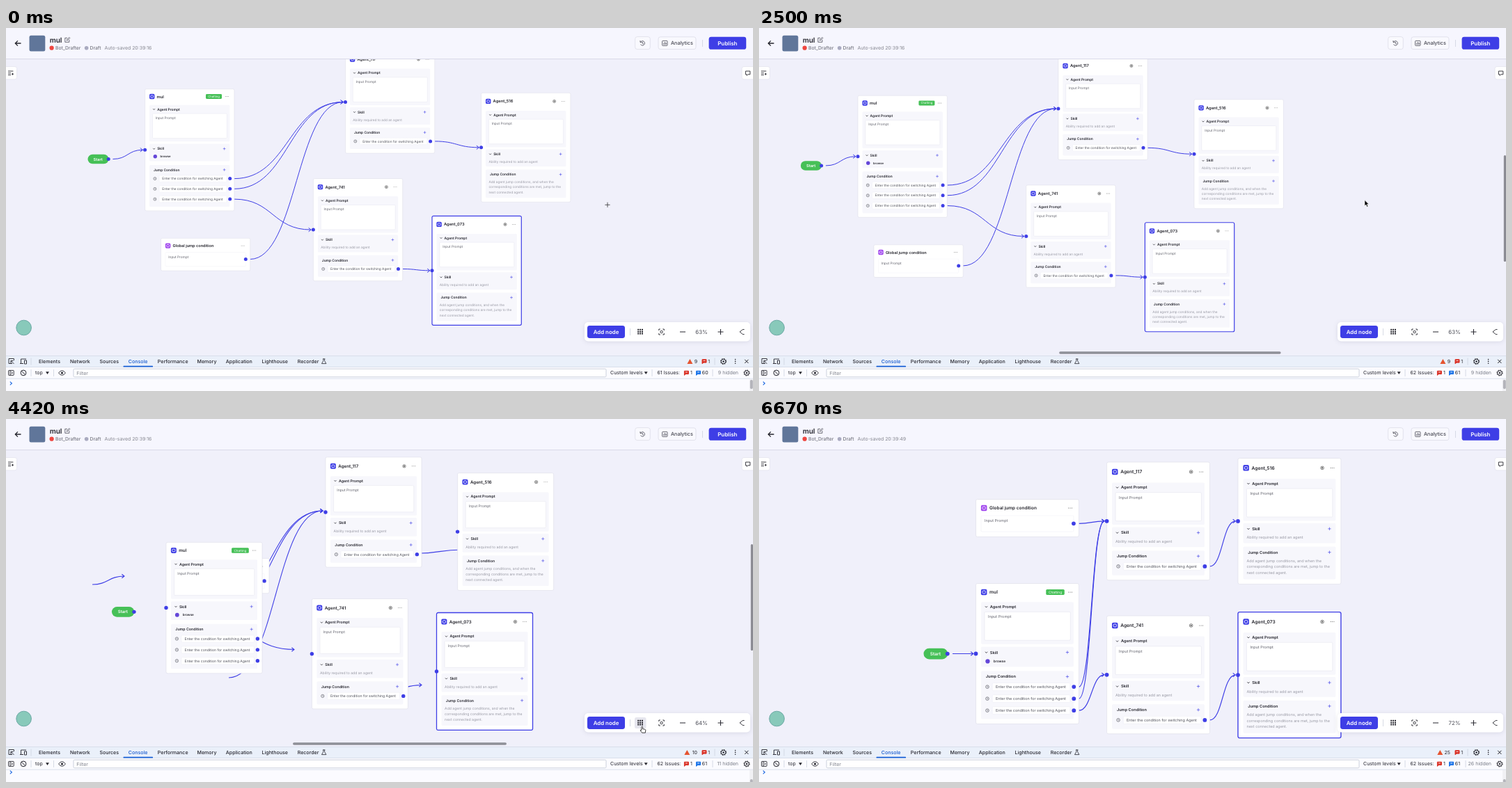
An HTML page that plays this animation: 1073 by 522 pixels, repeating every 7160 ms.

```html
<!DOCTYPE html>
<html lang="en">
<head>
<meta charset="utf-8">
<title>Agent flow editor</title>
<style>
html, body { margin: 0; width: 100%; height: 100%; overflow: hidden; background: #f0f0fa; }
svg { display: block; width: 1073px; height: 522px; font-family: Inter, sans-serif; text-rendering: geometricPrecision; }
text { white-space: pre; }
</style>
</head>
<body>
<svg id="stage" viewBox="0 0 1073 522"></svg>
<script>
const BLUE = '#3e3ee6', INK = '#24242c', GREY = '#999aa5', MID = '#62636d';
const FPS = 12, LOOP = 7160;

// ---------- markup helpers ----------
const text = (x, cy, str, size, fill = INK, extra = '') =>
  `<text x="${x}" y="${(cy + size * .36).toFixed(2)}" font-size="${size}" fill="${fill}" ${extra}>${str}</text>`;
const bold = (x, cy, str, size, fill = INK, extra = '') => text(x, cy, str, size, fill, 'font-weight="600" ' + extra);
const rect = (x, y, w, h, r, fill, extra = '') =>
  `<rect x="${x}" y="${y}" width="${w}" height="${h}" rx="${r}" fill="${fill}" ${extra}/>`;
const dot = (x, y, r, fill, extra = '') => `<circle cx="${x}" cy="${y}" r="${r}" fill="${fill}" ${extra}/>`;
const line = (d, stroke = INK, w = 1, extra = '') =>
  `<path d="${d}" fill="none" stroke="${stroke}" stroke-width="${w}" ${extra}/>`;
const plus = (x, y, r, stroke, w) => line(`M${x - r} ${y}h${2 * r}M${x} ${y - r}v${2 * r}`, stroke, w);
const dots = (x, y, gap, r, fill) => [-gap, 0, gap].map(d => dot(x + d, y, r, fill)).join('');
const edging = (color, w = .6) => `stroke="${color}" stroke-width="${w}"`;
const middle = 'text-anchor="middle"';

// ---------- flow nodes, drawn at 63 % zoom ----------
const W = 128.3;
const chevron = y => line(`M11.6 ${y - .7}l1.4 1.5 1.4 -1.5`, INK, .7);
const port = (x, y) => dot(x, y, 2.5, BLUE);
const frame = (h, selected) => rect(0, 0, W, h, 2, '#fff', selected ? edging(BLUE, 1.2) : edging('#dfdfea'));
const section = (y, h) => rect(6.5, y, 115.3, h, 1.5, '#f7f7fc');
const nodeIcon = (y, fill) => rect(6.4, y - 3.7, 7.4, 7.4, 1.7, fill) +
  rect(8.2, y - 1.7, 3.8, 3.4, 1.1, 'none', edging('#fff', .7));

function condition(y) {
  return dot(14.3, y, 2, 'none', edging('#55565f')) + line(`M14.3 ${y - 1}v1.2h.9`, '#55565f', .5) +
    rect(20.5, y - 4.8, 97, 9.6, 1.2, '#fff', edging('#ececf4', .5)) +
    text(24.7, y, 'Enter the condition for switching Agent', 4.75, '#50515b') + port(122.1, y);
}

function agent(title, h, rows, opts = {}) {
  const main = opts.main;
  const [yT, yA, yS, yJ] = main ? [10.8, 29.1, 85.9, 116.2] : [12.1, 31.6, 88, 117.3];
  let out = frame(h, opts.selected) + nodeIcon(yT, BLUE) + bold(17, yT, title, 5.75) + dots(117.6, yT, 2, .45, '#444');
  out += main
    ? rect(87.4, yT - 3.5, 23, 7, 1.4, '#46c057') + text(98.9, yT, 'Chatting', 4.2, '#fff', middle)
    : dot(105, yT, 2, 'none', edging('#444')) + dot(105, yT, .9, '#444');
  out += section(yA - 6, 52.5) + chevron(yA) + bold(17.6, yA, 'Agent Prompt', 4.9) +
    rect(10.8, yA + 6.3, 107, 35.5, 1.2, '#fff', edging('#e4e4ee', .5)) + text(15.2, yA + 12.5, 'Input Prompt', 4.75, MID);
  out += section(yS - 7, 25) + chevron(yS) + bold(17.6, yS, 'Skill', 4.9) + plus(114, yS, 1.9, BLUE, .55);
  out += main
    ? dot(14.7, yS + 11.2, 2.7, '#6446d8') + bold(22, yS + 11.2, 'browse', 4.2)
    : text(10.8, yS + 10.9, 'Ability required to add an agent', 4.75, GREY);
  out += section(yJ - 7, h - yJ + 1) + bold(12.4, yJ, 'Jump Condition', 4.9) + plus(114, yJ, 1.9, BLUE, .55);
  for (let i = 0; i < rows; i++) out += condition(yJ + 12.7 + i * 14.75);
  if (!rows) ['Add agent jump conditions, and when the', 'corresponding conditions are met, jump to the', 'next connected agent.']
    .forEach((s, i) => out += text(10.8, yJ + 10.8 + i * 7.2, s, 4.75, GREY));
  return out + port(0, h / 2);
}

const globalNode = frame(46.8) + nodeIcon(10.8, '#a045ee') + bold(17, 10.8, 'Global jump condition', 5.6) +
  dots(117.6, 10.8, 2, .45, '#444') + rect(6.5, 20.4, 115.3, 20, 1, '#fff', edging('#f0f0f6', .5)) +
  text(10.8, 26.5, 'Input Prompt', 4.75, MID) + port(121.8, 30.2);
const startNode = rect(0, 0, 30, 13.6, 6.8, '#46c057') + bold(14.7, 6.8, 'Start', 5.6, '#fff', middle) + port(29.7, 6.8);

// at: scattered layout, mid-way layout, tidy layout
const nodes = {
  start:  { art: startNode, in: 0, at: [[117.5, 181.7], [152, 270], [236.5, 329.7]] },
  global: { art: globalNode, in: 0, at: [[222.5, 302.3], [240, 200.4], [311.5, 115.5]] },
  mul:    { art: agent('mul', 175.2, 3, { main: true }), in: 87.6, at: [[199.6, 87.7], [230, 177.3], [311.5, 236.5]] },
  a117:   { art: agent('Agent_117', 147.2, 1), in: 73.6, at: [[487.5, 32.9], [459, 54.8], [499.6, 62]] },
  a516:   { art: agent('Agent_516', 157, 0), in: 78.5, at: [[682.6, 93.3], [648.6, 77.6], [688, 56.4]] },
  a741:   { art: agent('Agent_741', 147.2, 1), in: 73.6, at: [[441.4, 216.5], [439.4, 258.5], [499.6, 283]] },
  a073:   { art: agent('Agent_073', 157, 0, { selected: true }), in: 78.5, at: [[612, 270.3], [618.5, 278.5], [688, 277.6]] },
};
const SCALE = [1, 1.076, 1.153];

// from, port x, port y, to, end points while the layout is moving
const edges = [
  ['start', 29.7, 6.8, 'a_mul', [124, 238, 170, 226]],
  ['mul', 122.1, 128.9, 'a117', [305, 270, 455, 132]],
  ['mul', 122.1, 143.6, 'a117', [305, 285, 455, 132]],
  ['mul', 122.1, 158.4, 'a741', [305, 300, 414, 331.5]],
  ['global', 121.8, 30.2, 'a117', [320, 372, 455, 132]],
  ['a117', 122.1, 130, 'a516', [590, 193.3, 655, 188]],
  ['a741', 122.1, 130, 'a073', [548, 390, 597, 382.5]],
].map(([from, x, y, to, moving]) => ({ from, x, y, to: to === 'a_mul' ? 'mul' : to, moving }));

// ---------- fixed interface ----------
const gear = (x, y) => dot(x, y, 3.3, 'none', edging(INK, 1)) + dot(x, y, 1.2, INK) +
  dot(x, y, 4.1, 'none', 'stroke="#24242c" stroke-width="1" stroke-dasharray="1.6 1.62"');
const bubble = (x, y, fill) => line(`M${x - 3} ${y - 2.8}h6v4.4h-4l-2 1.7z`, fill, 1, `style="fill:${fill}"`) +
  line(`M${x - 1.5} ${y - 1}h3`, '#fff', .8);
const caret = (x, y) => `<path d="M${x - 2.4} ${y - 1.8}h4.8l-2.4 3.8z" fill="${INK}"/>`;
const divider = (x, y) => line(`M${x} ${y - 5}v10`, '#cfd3df', .8);

const header = rect(0, 0, 1073, 44, 0, '#f6f6fe') + line('M0 44.5H1073', '#d9d9e8', 1) +
  line('M21.5 22h-8m3.4-3.6L13.3 22l3.6 3.6', INK, 1.3) +
  rect(33.5, 10.7, 22.8, 22.8, 2.5, '#60769a') +
  bold(62.7, 17.4, 'mul', 10) +
  line('M88 14.3h-3.2v6h6V17M87.3 18l.3-1.4 3.2-3.2 1 1-3.2 3.2z', '#4b4b55', .8) +
  dot(65.6, 28.7, 3.1, '#ee4640') + text(71, 28.7, 'Bot_Drafter', 6.8, MID) +
  dot(115.6, 28.7, 2.8, '#a9aac0') + text(120.6, 28.7, 'Draft', 6.8, MID) +
  text(141.5, 28.7, '', 6.9, '#85868f', 'id="saved"') +
  rect(903.7, 12.6, 21.6, 18, 3, '#f9f9fe', edging('#dcdce8', .8)) +
  line('M911.5 20.2a3.2 3.2 0 1 1 0 3.3M911 18v2.5h2.4M914.4 20v2.2l1.6.9', '#44454f', .8) +
  rect(937, 12.8, 54, 17.8, 3, '#f9f9fe', edging('#dcdce8', .8)) +
  rect(942.6, 18.4, 7.4, 7, .8, 'none', edging('#44454f', .8)) + line('M944.6 24v-2M946.4 24v-4M948.2 24v-3', '#44454f', .8) +
  text(955, 21.8, 'Analytics', 7.2, '#44454f', 'font-weight="500"') +
  divider(1000.5, 22) + rect(1009.6, 12.8, 53.6, 18, 3.4, BLUE) + bold(1036.3, 21.8, 'Publish', 7.9, '#fff', middle);

const sideTabs = rect(-4, 55.5, 19.6, 18.3, 3, '#fff', edging('#dedeea')) +
  line('M3 62h7.4M3 64.8h4M3 67.4h4M8 66.2h3M9.5 64.7v3', INK, .9) +
  rect(1057, 55.5, 20, 18.3, 3, '#fff', edging('#dedeea')) +
  line('M1062.4 62h6.4v4.8h-3.2l-1.6 1.5v-1.5h-1.6z', INK, .9);

let gridIcon = '';
for (let i = 0; i < 9; i++) gridIcon += rect(907.2 + i % 3 * 2.9, 432.8 + Math.floor(i / 3) * 2.9, 2, 2, .3, INK);
const toolbar = rect(831, 423, 238, 27.5, 5, '#fff', 'style="filter:drop-shadow(0 1px 3px #3333551f)"') +
  rect(835, 428, 54, 18, 3.4, BLUE) + bold(862, 436.8, 'Add node', 7.9, '#fff', middle) + divider(896.5, 437) +
  rect(903, 429, 16.5, 16, 2.5, '#e6e6ee', 'id="hover"') + gridIcon +
  line('M937.8 435v-2h2M943.3 433h2v2M945.3 439v2h-2M939.8 441h-2v-2', INK, .9) + dot(941.6, 437, 1.7, 'none', edging(INK, .9)) +
  line('M968 437h8', INK, 1) + text(999, 436.8, '', 7.9, '#4c4d57', middle + ' id="zoom"') +
  plus(1026.5, 437, 4, INK, 1) + line('M1060.5 433.5h-2.2l-4.3 3.4 4.3 3.6h2.2', INK, .9);

const tooltip = `<g id="tip">${rect(890, 404.2, 42.6, 20, 3.2, '#2a2b33')}<path d="M908.5 424h5.4l-2.7 2.8z" fill="#2a2b33"/>` +
  text(911.2, 414, 'Fit View', 7.8, '#fff', middle) + '</g>';

const tabs = [[47, 'Elements'], [92, 'Network'], [134.4, 'Sources'], [175.8, 'Console'], [217.8, 'Performance'],
  [274.5, 'Memory'], [315.8, 'Application'], [367.5, 'Lighthouse'], [418.7, 'Recorder']];
const devtools = rect(0, 471, 1073, 51, 0, '#fbfbff') + rect(0, 471, 1073, 16.5, 0, '#eaf0fa') +
  line('M0 471.5H1073M0 487.5H1073M0 504.2H1073', '#d3dae8', .8) +
  line('M9 482.5H4v-7h7.4v2.6M7 478.5l4.5 4.5M7 482v-3.5h3.5', INK, .9) +
  line('M21.5 482v-6h7.5M20 482.5h5M26.5 478h3v5h-3z', INK, .9) + divider(36, 479.5) +
  tabs.map(([x, s]) => text(x, 479.3, s, 7.05, s === 'Console' ? '#1559cf' : INK, 'font-weight="500"')).join('') +
  rect(168.5, 485.7, 42.5, 1.8, .6, '#1a62d8') +
  line('M455 475.8h3.4M455.8 476v2.6l-2.3 4h6.4l-2.3-4v-2.6', INK, .8) +
  '<path id="warnIcon" d="M0 -3.8l4 7h-8z" fill="#e5532f"/>' + text(993, 479.4, '', 7.05, INK, 'id="warn" text-anchor="end"') +
  bubble(1003, 479.5, '#d93025') + text(1008.3, 479.4, '1', 7.05) + divider(1018, 479.5) + gear(1030.5, 479.5) +
  dot(1047.6, 476.6, .8, INK) + dot(1047.6, 479.4, .8, INK) + dot(1047.6, 482.2, .8, INK) +
  line('M1061.2 476.8l5.2 5.2m0-5.2l-5.2 5.2', INK, 1) +
  rect(3.6, 492.4, 7.6, 7, .6, 'none', edging(INK, .9)) + line('M6 492.4v7M7.4 494.3l2 1.6-2 1.6', INK, .9) +
  dot(25, 495.9, 3.9, 'none', edging(INK, 1)) + line('M22.3 493.2l5.4 5.4', INK, 1) + divider(36, 496) +
  text(42, 495.9, 'top', 7.05) + caret(59.5, 496) + divider(68.5, 496) +
  line('M75.5 496q5-6.6 10 0q-5 6.6-10 0z', INK, .9) + dot(80.5, 496, 1.6, INK) +
  rect(97, 490.2, 765, 11.6, 1.5, '#fff', edging('#bfc6d4', .8)) + text(101.3, 496, 'Filter', 7.05, '#80848e') +
  text(868, 495.9, 'Custom levels', 7.05) + caret(919.2, 496) + divider(928, 496) +
  text(935.5, 495.9, '', 7.05, INK, 'id="issues"') + bubble(977.4, 496, '#d93025') + text(983, 495.9, '1', 7.05) +
  bubble(994.6, 496, '#1a73e8') + text(999.8, 495.9, '', 7.05, INK, 'id="info"') + divider(1015, 496) +
  text(1052, 495.9, '', 7.05, '#777b85', 'id="hidden" text-anchor="end"') + gear(1064, 496) +
  line('M5.8 -2.4l2.6 2.4-2.6 2.4', '#1a66e0', 1.1, 'id="prompt"') +
  rect(1068, 505, 5, 17, 0, '#f1f1f4') + rect(1068.8, 0, 4, 13, 1.8, '#b4b4ba', 'id="thumb"');

const scrollbars = `<g id="bars">${rect(1069.8, 0, 3.2, 153, 1.5, '#8b8b93', 'id="barV"')}${rect(0, 465.2, 10, 3.6, 1.8, '#8f9098', 'id="barH"')}</g>`;
const cursors = '<g id="cursor">' +
  `<g id="cross">${plus(0, 0, 3.6, '#333', .8)}</g>` +
  '<path id="arrow" d="M0 0v8.2l1.9-1.7 1.4 3.2 1.5-.7-1.4-3h2.6z" fill="#000" stroke="#fff" stroke-width=".6"/>' +
  '<path id="hand" d="M-1.2 1q0-1.2.9-1.2t.9 1.2v2.2l3.2.6q1.1.3 1 1.5l-.5 3.4h-4.6l-2.6-3.2q-.2-1.2 1.7-.5z" fill="#fff" stroke="#111" stroke-width=".8"/></g>';

const stage = document.getElementById('stage');
stage.innerHTML = rect(0, 0, 1073, 522, 0, '#f0f0fa') +
  edges.map((_, i) => line('', BLUE, 1, `id="edge${i}"`)).join('') +
  Object.entries(nodes).map(([id, n]) => `<g id="${id}">${n.art}</g>`).join('') +
  dot(25.6, 431, 10.8, '#88c9ba', edging('#6eaaa6', 1)) + sideTabs + scrollbars + toolbar + tooltip + header + devtools + cursors;

// ---------- motion ----------
const $ = id => document.getElementById(id);
const lerp = (a, b, k) => a + (b - a) * k;
const show = (id, on) => $(id).setAttribute('visibility', on ? 'inherit' : 'hidden');
const put = (id, s) => { if ($(id).textContent !== s) $(id).textContent = s; };
const within = (n, a, b) => n >= a && n < b;

// value list of the last key that has been reached
const held = (keys, n) => keys.filter(k => k[0] <= n).pop().slice(1);
// linear between keys
function track(keys, n) {
  const i = keys.findIndex(k => k[0] > n);
  if (i < 0) return keys[keys.length - 1].slice(1);
  if (!i) return keys[0].slice(1);
  const [a, b] = [keys[i - 1], keys[i]], k = (n - a[0]) / (b[0] - a[0]);
  return a.slice(1).map((v, j) => lerp(v, b[j + 1], k));
}

const LAYOUT = [[50, 0], [53, 1], [54, 1], [56, 2]];
const POINTER = [[0, 864, 254.3], [4, 864, 254.3], [5, 866, 252], [6, 868, 250], [7, 868, 250], [8, 870, 247.6], [32, 870, 247.6],
  [35, 897, 375], [37, 909, 433], [38, 911, 438], [40, 914, 442.5], [59, 914, 442.5], [62, 970, 390], [65, 1041, 313],
  [67, 1041, 313], [76, 1046, 14], [80, 1050, -14]];
const ZOOM = [[0, '63%'], [52, '64%'], [55, '69%'], [56, '72%']];
const COUNTS = [[0, 9, 9], [51, 10, 11], [72, 25, 26]];

function drawFlow(n) {
  const p = track(LAYOUT, n)[0], a = Math.min(1, Math.floor(p)), k = p - a;
  const m = Math.max(0, n - 28);
  const pan = [-71.8 * (1 - Math.exp(-.81 * m)), 14 * (1 - Math.exp(-.56 * m))];
  const place = (id, l) => nodes[id].at[l].map((v, i) => l ? v : v + pan[i]);
  const scale = lerp(SCALE[a], SCALE[a + 1], k);
  for (const id in nodes) {
    const from = place(id, a), to = place(id, a + 1);
    $(id).setAttribute('transform', `translate(${lerp(from[0], to[0], k)} ${lerp(from[1], to[1], k)}) scale(${scale})`);
  }
  const ends = (e, l) => {
    if (l === 1) return e.moving;
    const s = SCALE[l], [fx, fy] = place(e.from, l), [tx, ty] = place(e.to, l);
    return [fx + (e.x + 6.3) * s, fy + e.y * s, tx - 3.2 * s, ty + nodes[e.to].in * s];
  };
  edges.forEach((e, i) => {
    const end = ends(e, a + 1);
    const [x1, y1, x2, y2] = ends(e, a).map((v, j) => lerp(v, end[j], k));
    const c = (x1 + x2) / 2;
    $('edge' + i).setAttribute('d', `M${x1} ${y1}C${c} ${y1} ${c} ${y2} ${x2} ${y2}m-3.6-2.7l3.6 2.7-3.6 2.7`);
    $('edge' + i).setAttribute('stroke-width', lerp(1, 1.15, p / 2));
  });
  show('bars', within(n, 29, 45) || within(n, 51, 68));
  const [barX, barW, barY] = track([[50, 396 - .61 * pan[0], 318.5, 183], [53, 412, 307, 180], [54, 412, 307, 180], [56, 383, 300, 177]], n);
  $('barH').setAttribute('x', barX);
  $('barH').setAttribute('width', barW);
  $('barV').setAttribute('y', barY);
}

function draw(n) {
  drawFlow(n);
  const [warn, hidden] = held(COUNTS, n), late = n >= 27, shifted = n >= 51;
  put('warn', String(warn));
  $('warnIcon').setAttribute('transform', `translate(${warn > 9 ? 978.3 : 982.4} 479.7)`);
  put('hidden', hidden + ' hidden');
  put('issues', (late ? 62 : 61) + ' Issues:');
  put('info', late ? '61' : '60');
  put('zoom', held(ZOOM, n)[0]);
  put('saved', 'Auto-saved 20:39:' + (n >= 77 ? 49 : 16));
  $('prompt').setAttribute('transform', `translate(0 ${shifted ? 508 : 511})`);
  $('thumb').setAttribute('y', shifted ? 518 : 506);
  show('hover', within(n, 38, 61));
  show('tip', within(n, 39, 51) || within(n, 55, 61));
  const [x, y] = track(POINTER, n);
  $('cursor').setAttribute('transform', `translate(${x} ${y})`);
  show('cursor', n < 80);
  show('cross', n < 8);
  show('hand', within(n, 38, 61));
  show('arrow', within(n, 8, 38) || n >= 61);
}

let last = -1;
function tick() {
  const n = Math.floor((performance.now() % LOOP + 3.4) * FPS / 1000);
  if (n !== last) draw(last = n);
  requestAnimationFrame(tick);
}
tick();
</script>
</body>
</html>
```
